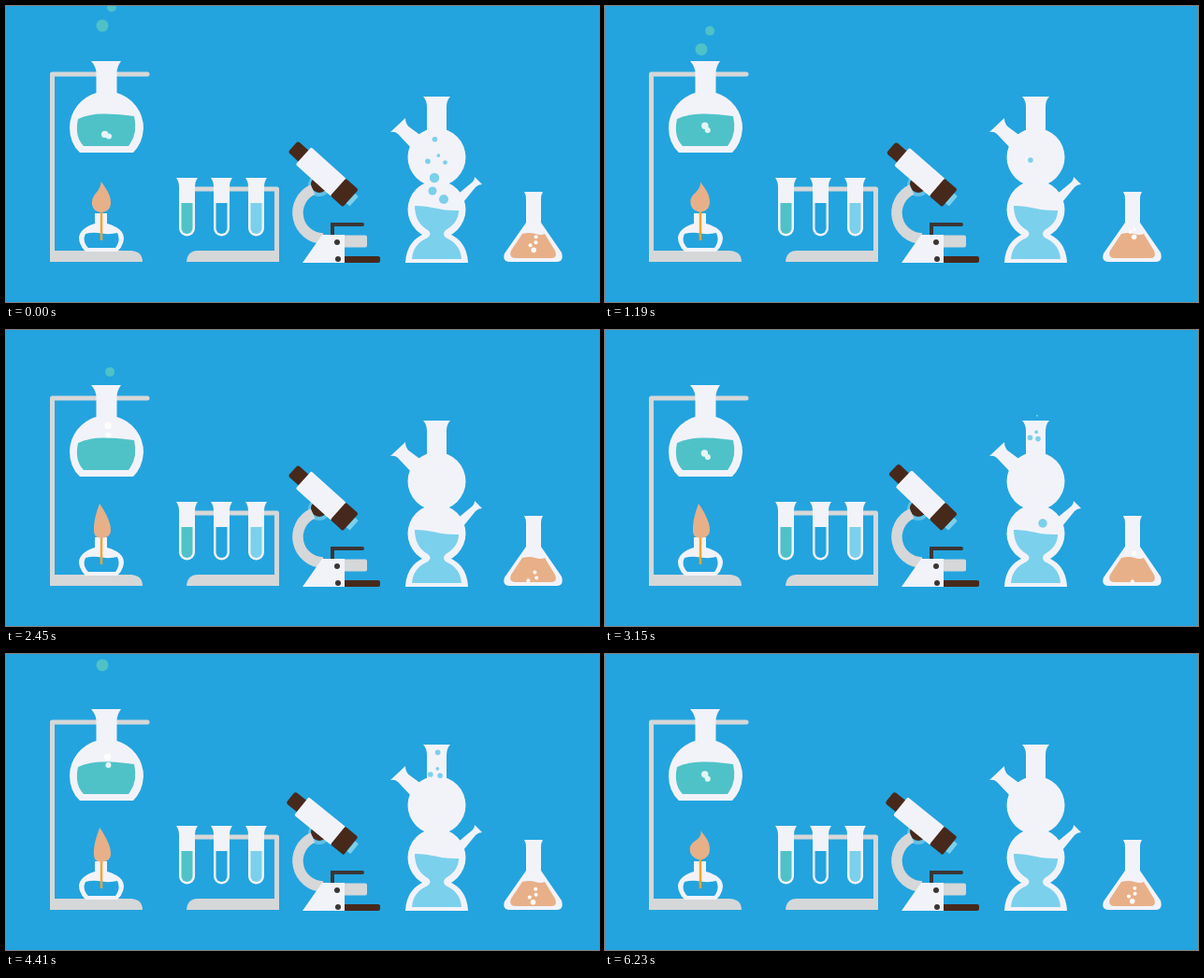
Animation of 634 by 317 pixels, one loop 6.3 s. Source, as an HTML page:

```html
<!DOCTYPE html>
<html lang="en">
<head>
<meta charset="utf-8">
<title>Laboratory</title>
<style>
  html, body { margin: 0; height: 100%; overflow: hidden; background: #23a4de; }
  svg { display: block; width: 100vw; height: 100vh; }
  .white { fill: #f2f3f9; }
  .gray { fill: #d6d7d9; }
  .teal { fill: #4fc2c8; }
  .sky { fill: #7bd0ec; }
  .blue { fill: #23a4de; }
  .peach { fill: #e8b088; }
  .brown { fill: #47291c; }
  .dark { fill: #3b3635; }
  .pure { fill: #fff; }
  .bar { fill: none; stroke: #d6d7d9; stroke-width: 5; stroke-linecap: round; stroke-linejoin: round; }
</style>
</head>
<body>
<svg viewBox="0 0 634 317">
  <defs>
    <path id="tube" d="M-11.5 184H11.5Q8.5 188 8.5 194V238A8.5 8.5 0 0 1-8.5 238V194Q-8.5 188-11.5 184Z"/>
    <path id="fill" d="M-6 211H6V238A6 6 0 0 1-6 238Z"/>
  </defs>

  <!-- stand and round flask -->
  <path class="bar" d="M151 73H49.5V270"/>
  <path class="gray" d="M47 274V262H134Q146 263 146 274Z"/>
  <g id="steam" class="teal"></g>
  <path class="white" d="M91 59H123Q118.5 65 118.5 72V93A39.5 39.5 0 0 1 147 131Q146 147 136 157H79Q68 147 68 130A39.5 39.5 0 0 1 96.5 93V72Q96.5 65 91 59Z"/>
  <path class="teal" d="M77 121Q90 115 106 115.5Q122 115.5 137 118Q141 135 133 147L131 150H83Q73 140 77 121Z"/>
  <g id="boil" class="pure" opacity=".85"></g>

  <!-- burner -->
  <path class="white" d="M95 222H108V233Q126 238 126 249Q125 258 119 263H85Q78 256 78 248Q79 238 95 233Z"/>
  <path class="blue" d="M85 244Q93 242 102 243.5Q111 245 119 243Q123 251 117 259H88Q81 252 85 244Z"/>
  <path d="M102 219V251" stroke="#f5a52d" stroke-width="2.5"/>
  <path id="flame" class="peach"/>

  <!-- test tubes -->
  <path class="bar" d="M190 196H289.5V270"/>
  <path class="gray" d="M193 274Q194 262 205 262H292V274Z"/>
  <g transform="translate(193.5)"><use href="#tube" class="white"/><use href="#fill" class="teal"/></g>
  <g transform="translate(230.5)"><use href="#tube" class="white"/><use href="#fill" class="blue"/></g>
  <g transform="translate(267.5)"><use href="#tube" class="white"/><use href="#fill" class="sky"/></g>

  <!-- microscope -->
  <circle cx="335" cy="192" r="12" fill="#5fc0e6"/>
  <circle class="brown" cx="335" cy="191" r="9"/>
  <path d="M328 196.5A27.5 27.5 0 0 0 339 249" fill="none" stroke="#d6d7d9" stroke-width="11.5"/>
  <rect class="gray" x="350" y="245.5" width="36" height="13" rx="2"/>
  <path d="M349 247V234H381" fill="none" stroke="#3b3635" stroke-width="4" stroke-linecap="round"/>
  <rect class="brown" x="352" y="268" width="48" height="7" rx="2"/>
  <path class="white" d="M317 275L338 245H362V275Z"/>
  <circle class="dark" cx="354" cy="253" r="3"/>
  <circle class="dark" cx="355" cy="271" r="3"/>
  <g id="scope">
    <rect class="sky" x="7" y="-7" width="6" height="14" rx="1"/>
    <rect class="brown" x="-75" y="-8" width="18" height="16" rx="3"/>
    <rect class="white" x="-60" y="-12.5" width="51" height="25" rx="2"/>
    <rect class="brown" x="-10" y="-12.5" width="18" height="25" rx="2"/>
  </g>

  <!-- double vessel -->
  <g class="white">
    <path d="M446 97H475Q471 101 471 108V140H450V108Q450 101 446 97Z"/>
    <circle cx="460.5" cy="162" r="31"/>
    <circle cx="460.5" cy="218" r="31"/>
    <path d="M427 275Q428 252 447 244H474Q493 252 494 275Z"/>
    <path d="M411 135Q416 134 419 137L435 154L448 142L431 129.5Q427 126 427 120Z"/>
    <path d="M501 183L509 191Q505 191 502 194L489 210L480 204L497 190Q501 187 501 183Z"/>
  </g>
  <path class="sky" d="M437 214Q447 213.5 459 216.5Q471 219.5 484 219Q484 232 470 240Q466 244 470 248Q486 255 487 271H434Q435 255 451 248Q456 244 451 240Q437 232 437 214Z"/>
  <g id="vessel" class="sky"></g>

  <!-- conical flask -->
  <path class="white" d="M554 199H574Q572 202 572 207V232L594 264Q597 274 588 274H539Q530 274 533 265L556 232V207Q556 202 554 199Z"/>
  <path class="peach" d="M552 244Q560 242 566 244Q572 246 576 244L587 262Q590 270 583 270H545Q537 270 540 262Z"/>
  <g id="cone" class="pure"></g>
</svg>

<script>
const LOOP = 6300, STEP = 70;
const $ = id => document.getElementById(id);

// Circles that rise from one height to another, each reborn every `gap` ms.
// A bubble is [start x, end x, radius, first birth].
function stream({ from, to, life, gap, power = 1, bubbles }, t) {
  return bubbles.map(([x0, x1, r, first]) => {
    const u = (t - first) % gap / life;
    if (u >= 1) return "";
    const rise = u ** power, drift = 1 - (1 - rise) ** 2;
    const size = r * Math.min(1, u / 0.1, (1 - u) / 0.12);
    return `<circle cx="${x0 + (x1 - x0) * drift}" cy="${from + (to - from) * rise}" r="${size}"/>`;
  }).join("");
}

const pop = (x, y, r, first, gap) =>
  ({ from: y, to: y, life: 700, gap, bubbles: [[x, x, r, first]] });

const streams = {
  steam: [{ from: 58, to: -8, life: 650, gap: 1440,
    bubbles: [[103, 103, 6.5, -364], [110, 113, 5, -559]] }],
  boil: [{ from: 142, to: 75, life: 1000, gap: 1010, power: 3,
    bubbles: [[105, 110, 3.7, -410], [110, 109, 3, -330]] }],
  vessel: [
    { from: 175, to: 88, life: 700, gap: 1370,
      bubbles: [[453, 462, 2.8, -260], [463, 461, 1.9, -120], [471, 462, 2.8, -60], [450, 455, 2.8, -70]] },
    pop(468, 207, 5, -170, 2700),
    pop(458, 184, 5.2, -350, 5500),
    pop(456, 198, 4.5, -300, 1940)
  ],
  cone: [{ from: 274, to: 235, life: 800, gap: 900,
    bubbles: [[563, 567, 2, -547], [562, 566, 2.8, -260], [568, 566, 2, -425], [557, 562, 2, -366]] }]
};

// The flame swings between a tall leaf (0) and a squat curl (1).
function flamePath(t) {
  const curl = (0.5 + 0.5 * Math.cos(2 * Math.PI * (t - 650) / 5200)) ** 4;
  const x = 100 + 3 * curl, y = 186 + 4 * curl;
  const left = 94 - 4 * curl, right = 112;
  const belly = 214 - 6 * curl, bottom = 222.5 - 3 * curl;
  return `M${x} ${y}C${x + 5} ${y + 7} ${right} ${belly - 9} ${right} ${belly}
    C${right} ${belly + 7} 107 ${bottom} 102 ${bottom}
    C97 ${bottom} ${left} ${belly + 7} ${left} ${belly}
    C${left} ${belly - 10} ${x - 4 + 7 * curl} ${y + 11} ${x} ${y}Z`;
}

// Eased value between a few [time, angle] points
const tilts = [[0, 0], [700, 0], [1680, -2], [3150, 1.8], [4410, -3], [LOOP, -3]];
function tiltAt(t) {
  const i = tilts.findIndex(([time]) => time > t);
  const [t0, a0] = tilts[i - 1], [t1, a1] = tilts[i];
  const u = (t - t0) / (t1 - t0);
  return a0 + (a1 - a0) * u * u * (3 - 2 * u);
}

function draw(t) {
  for (const id in streams)
    $(id).innerHTML = streams[id].map(s => stream(s, t)).join("");
  $("flame").setAttribute("d", flamePath(t));
  $("scope").setAttribute("transform", `translate(362.5 200.6) rotate(${42 + tiltAt(t)})`);
}

const begin = performance.now();
function tick() {
  const t = (performance.now() - begin) % LOOP;
  draw(Math.floor(t / STEP) * STEP);
  requestAnimationFrame(tick);
}
tick();
</script>
</body>
</html>
```
